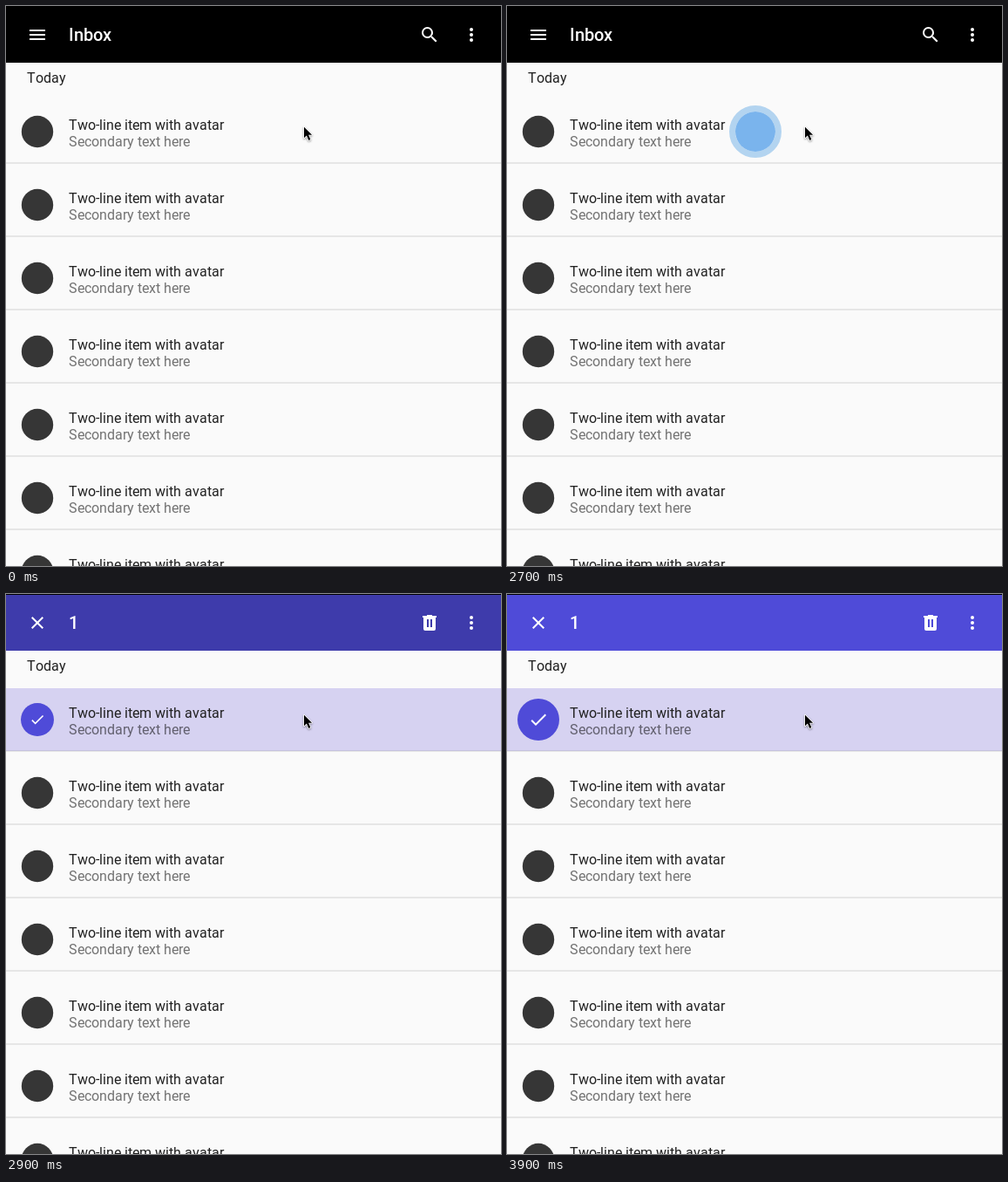
An HTML page that plays this animation: 568x642 px, repeating every 4000 ms.

```html
<!DOCTYPE html>
<html lang="en">
<head>
<meta charset="utf-8">
<title>Inbox selection</title>
<style>
  html, body { margin: 0; width: 100%; height: 100%; overflow: hidden; background: #fafafa; }
  svg { display: block; }
  text { font: 16px Roboto, sans-serif; font-kerning: none; fill: #212121; white-space: pre; }
  .secondary { fill: #000; fill-opacity: .54; }
  .title { font-size: 20px; font-weight: 500; fill: #fff; }
  .icon { fill: #fff; fill-rule: evenodd; }
</style>
</head>
<body>
<svg width="568" height="642" viewBox="0 0 568 642">
  <rect id="highlight" y="108" width="568" height="72" fill="#d6d2f1"/>
  <g id="rows"></g>
  <text x="24" y="88">Today</text>

  <rect width="568" height="65"/>
  <rect id="bar" y="1" width="568" height="64"/>
  <g id="inbox">
    <path class="icon" transform="translate(24 21)" d="M3 6h18v2H3zM3 11h18v2H3zM3 16h18v2H3z"/>
    <text class="title" x="72" y="40">Inbox</text>
    <path class="icon" transform="translate(474 21)" d="M9.5 3A6.5 6.5 0 0 1 16 9.5c0 1.61-.59 3.09-1.56 4.23l.27.27h.79l5 5-1.5 1.5-5-5v-.79l-.27-.27A6.52 6.52 0 0 1 9.5 16a6.5 6.5 0 0 1 0-13m0 2C7 5 5 7 5 9.5S7 14 9.5 14 14 12 14 9.5 12 5 9.5 5z"/>
  </g>
  <g id="selection">
    <path class="icon" transform="translate(24 21)" d="M19 6.41 17.59 5 12 10.59 6.41 5 5 6.41 10.59 12 5 17.59 6.41 19 12 13.41 17.59 19 19 17.59 13.41 12z"/>
    <text class="title" x="72" y="40">1</text>
    <path class="icon" transform="translate(474 21)" d="M9 3v1H4v2h1v13a2 2 0 0 0 2 2h10a2 2 0 0 0 2-2V6h1V4h-5V3zM9 8h2v9H9zM13 8h2v9h-2z"/>
  </g>
  <g class="icon">
    <circle cx="534" cy="27" r="2"/><circle cx="534" cy="33" r="2"/><circle cx="534" cy="39" r="2"/>
  </g>

  <g id="check">
    <circle r="24" fill="#4f4bd8"/>
    <path class="icon" transform="translate(-12 -12)" d="M21 7 9 19l-5.5-5.5 1.41-1.41L9 16.17 19.59 5.59z"/>
  </g>

  <g id="press" transform="translate(285 144)">
    <circle id="ring" r="26.5" fill="none" stroke="#b3d4f0" stroke-width="7" pathLength="1" transform="rotate(-90)"/>
    <circle r="23" fill="#7ab4ed"/>
  </g>

  <path d="M342 138.7v12.6l2.9-2.7 2.4 5.4 2.1-.9-2.3-5.3h4z" stroke="#fff" stroke-width="1.6"
    stroke-linejoin="round" paint-order="stroke" style="filter: drop-shadow(0 1px 1px #0006)"/>
</svg>
<script>
  const el = id => document.getElementById(id);
  const clamp = x => Math.min(1, Math.max(0, x));
  const easeInOut = x => x < 0.5 ? 2 * x * x : 1 - 2 * (1 - x) ** 2;
  const show = (id, on) => el(id).setAttribute('visibility', on ? 'visible' : 'hidden');

  const LOOP = 4000, STEP = 100, PRESS = 1700, HOLD = 1000, SELECT = 2800;

  el('rows').innerHTML = Array.from({ length: 7 }, (_, i) => `
    <g transform="translate(0 ${i * 84})">
      <circle cx="36" cy="144" r="18.2" fill="#363636"/>
      <text x="72" y="142">Two-line item with avatar</text>
      <text class="secondary" x="72" y="161">Secondary text here</text>
      <rect y="179" width="568" height="2" fill="#000" opacity=".08"/>
    </g>`).join('');

  // Place every glyph on a whole pixel, as hinted text does.
  const pen = document.createElement('canvas').getContext('2d');
  function snapGlyphs(text) {
    const { fontWeight, fontSize, fontFamily } = getComputedStyle(text);
    pen.font = `${fontWeight} ${fontSize} ${fontFamily}`;
    let x = +text.getAttribute('x');
    const starts = [...text.textContent].map(char => {
      const start = x;
      x += Math.round(pen.measureText(char).width);
      return start;
    });
    text.setAttribute('x', starts.join(' '));
  }
  document.querySelectorAll('text').forEach(snapGlyphs);

  function draw(now) {
    // The screen refreshes ten times a second.
    const t = Math.floor(now % LOOP / STEP) * STEP;
    const selected = t >= SELECT;
    const grow = selected ? clamp((t - SELECT + 58) / 200) : 0;

    show('press', t >= PRESS && !selected);
    show('inbox', !selected);
    for (const id of ['selection', 'highlight', 'check']) show(id, selected);

    const held = easeInOut(clamp((t - PRESS) / HOLD));
    el('ring').setAttribute('stroke-dasharray', held < 1 ? `${held} 2` : 'none');
    el('bar').setAttribute('fill', `rgb(${[79, 75, 216].map(c => Math.round(c * grow))})`);
    el('check').setAttribute('transform', `translate(36 144) scale(${grow})`);
  }

  const start = performance.now();
  function tick() {
    draw(performance.now() - start);
    requestAnimationFrame(tick);
  }
  tick();
</script>
</body>
</html>
```
